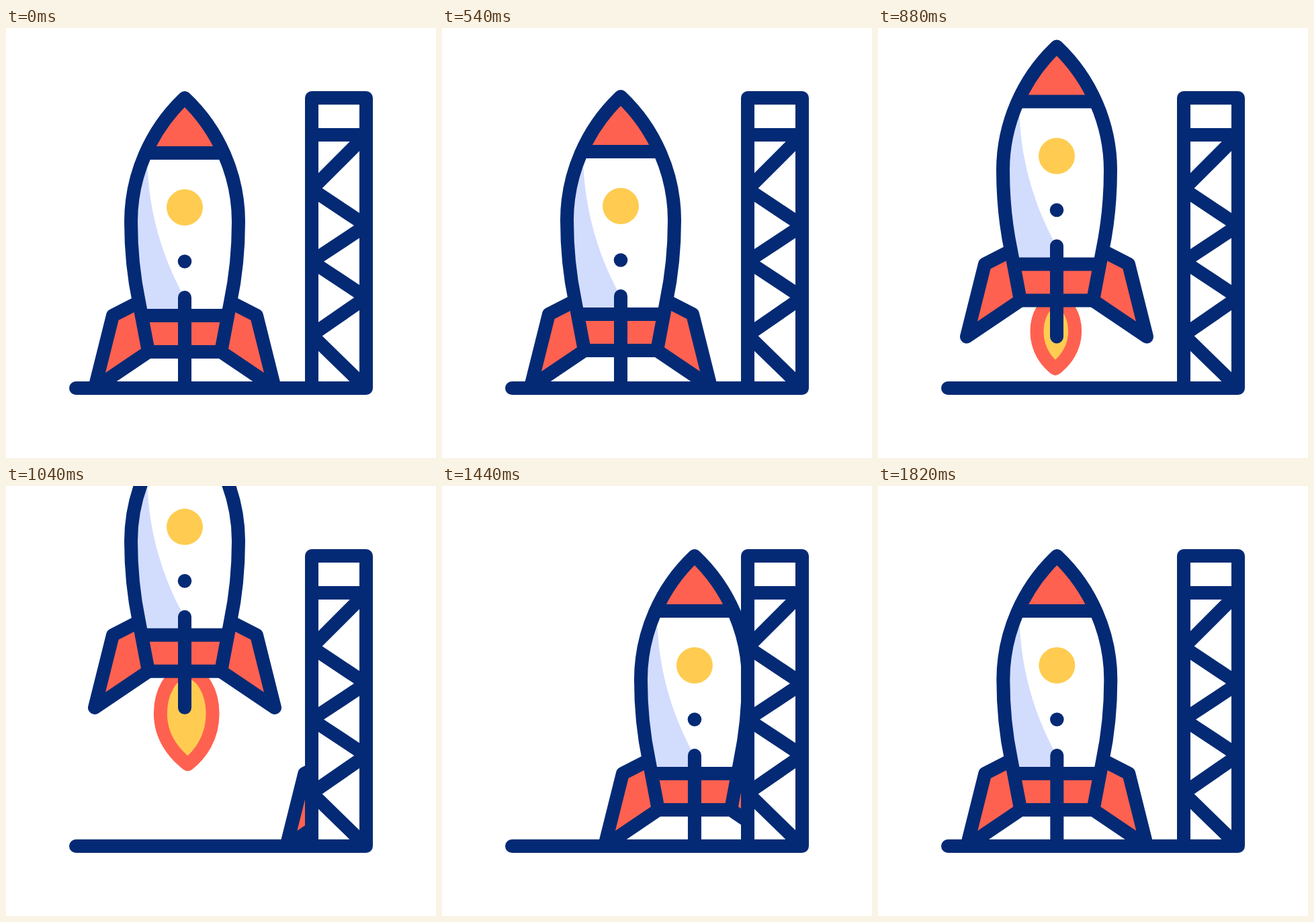
Animation, 640 px wide and 640 px high, one loop 2400 ms. Source, as an HTML page:

```html
<!DOCTYPE html>
<html lang="en">
<head>
<meta charset="utf-8">
<title>Rocket launch</title>
<style>
  html, body { margin: 0; width: 100%; height: 100%; overflow: hidden; background: #fff; }
  svg { display: block; width: 100vw; height: 100vh; }
  .line { fill: none; stroke: #042a75; stroke-width: 20; stroke-linecap: round; stroke-linejoin: round; }
  .red { fill: #ff6150; }
  .white { fill: #fff; }
  #flame { fill: #ffcc51; stroke: #ff6150; stroke-width: 20; stroke-linejoin: round; }
</style>
</head>
<body>
<svg viewBox="0 0 640 640">
  <defs>
    <path id="hull" d="M266 104C215 152 186 220 186 288C186 330 190 370 198 408L212 482H320L334 408C342 370 346 330 346 288C346 220 317 152 266 104Z"/>
    <clipPath id="inHull"><use href="#hull"/></clipPath>
    <clipPath id="leftOfTower"><path d="M0 0H455V640H0Z"/></clipPath>
    <path id="fin" d="M198 408L159 428L132 536L212 482"/>
    <g id="rocket">
      <g class="line">
        <use href="#fin" class="red"/>
        <use href="#fin" class="red" transform="matrix(-1 0 0 1 532 0)"/>
      </g>
      <use href="#hull" class="white"/>
      <g clip-path="url(#inHull)">
        <path d="M150 186H210C210 270 232 340 266 402V428H150Z" fill="#d2dcfd"/>
        <path class="red" d="M150 90H380V186H150ZM150 428H380V490H150Z"/>
      </g>
      <use href="#hull" class="line"/>
      <path class="line" d="M210 186H322M202 428H330M266 401V536"/>
      <circle cx="266" cy="267" r="27" fill="#ffcc51"/>
      <circle cx="266" cy="347.5" r="10.3" fill="#042a75"/>
    </g>
  </defs>

  <g clip-path="url(#leftOfTower)"><use id="next" href="#rocket"/></g>
  <g id="ship">
    <path id="flame"/>
    <use href="#rocket"/>
  </g>
  <path class="line" d="M104 536H536V104H455V536M455 159H536L455 240L536 294L455 347.5L536 401L455 457L536 536"/>
</svg>
<script>
const LOOP = 2400;
const [ship, next, flame] = ["ship", "next", "flame"].map(id => document.getElementById(id));

const progress = (t, from, to) => Math.min(1, Math.max(0, (t - from) / (to - from)));
const ease = (t, from, to) => {
  const u = progress(t, from, to);
  return u * u * (3 - 2 * u);
};
const move = (el, x, y) => el.setAttribute("transform", `translate(${x} ${y})`);

function flamePath(t) {
  const grow = ease(t, 540, 1060);
  const lean = -5 + 9.5 * progress(t, 540, 1040) ** 3;
  const top = 483, mid = top + 62 * grow, tip = top + 1 + 137 * grow;
  const w = 39 * grow, x = 266 + 0.6 * lean, tipX = 266 + lean;
  const shoulder = (top + mid) / 2;
  const waist = mid + 0.47 * (tip - mid), low = tip - 0.2 * (tip - mid);
  return `M${x} ${top}C${x - 0.6 * w} ${top} ${x - w} ${shoulder} ${x - w} ${mid}` +
    `C${x - w} ${waist} ${tipX - 0.5 * w} ${low} ${tipX} ${tip}` +
    `C${tipX + 0.5 * w} ${low} ${x + w} ${waist} ${x + w} ${mid}` +
    `C${x + w} ${shoulder} ${x + 0.6 * w} ${top} ${x} ${top}Z`;
}

function draw(now) {
  const t = now % LOOP;

  // Rumble on the pad, then lift off with growing speed
  const shakeX = 6 * ease(t, 0, 160) - 23 * ease(t, 160, 320) + 17 * ease(t, 320, 500);
  const shakeY = -7.5 * (ease(t, 0, 320) - ease(t, 320, 500));
  const lift = 205 * (Math.max(0, t - 312) / 728) ** 4;
  move(ship, shakeX, shakeY - lift);
  flame.setAttribute("d", flamePath(t));

  // A new rocket slides out from behind the tower
  move(next, 325 * (1 - ease(t, 818, 1840)), 0);
}

const start = performance.now();
function tick() {
  draw(performance.now() - start);
  requestAnimationFrame(tick);
}
tick();
</script>
</body>
</html>
```
